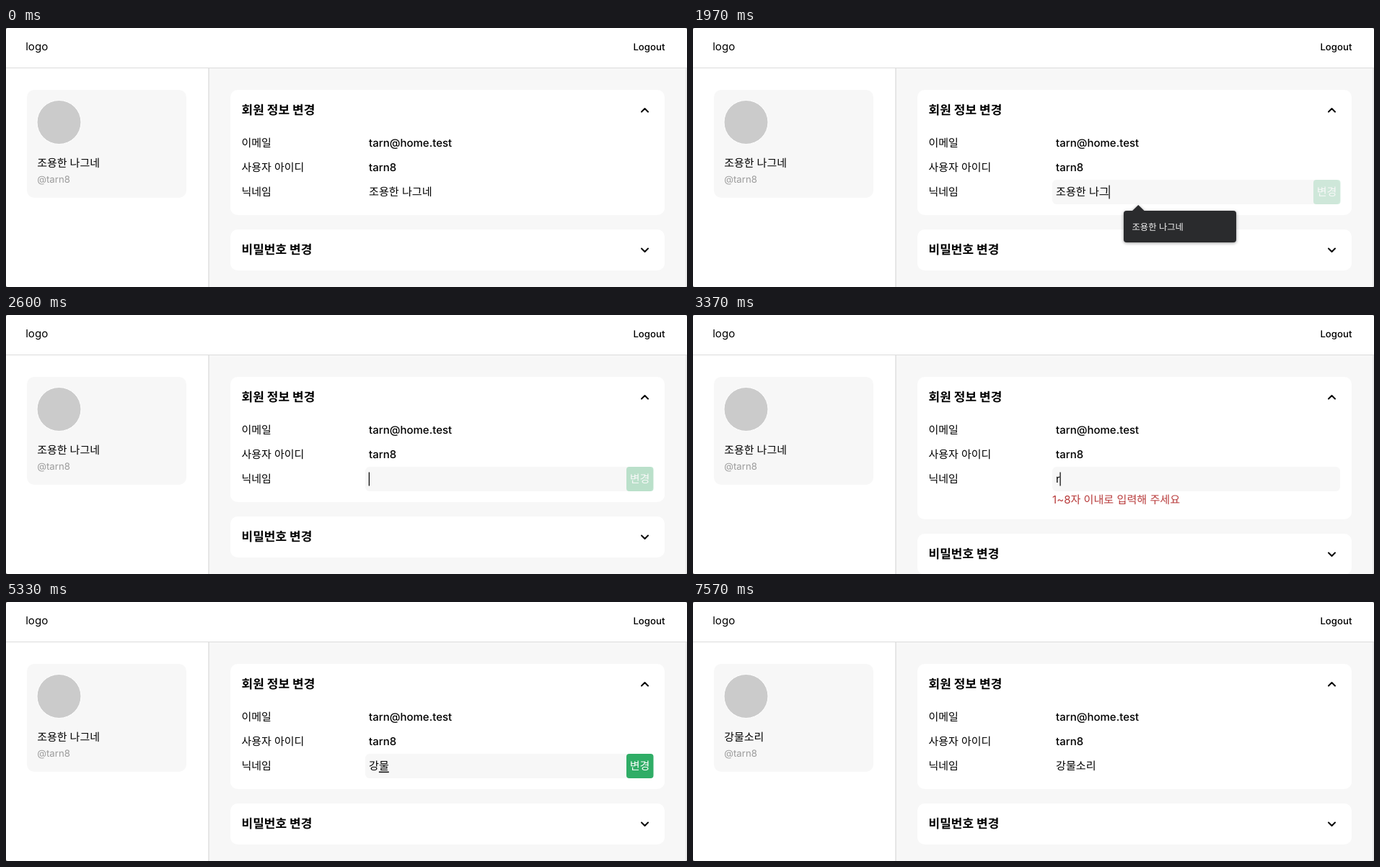
Write an HTML page that moves like this. It is 944 px wide and 360 px high and loops after 8 s.

```html
<!DOCTYPE html>
<html lang="ko">
<head>
<meta charset="utf-8">
<title>회원 정보 변경</title>
<style>
  html, body { margin: 0; width: 100%; height: 100%; overflow: hidden; background: #777; }
  svg { display: block; width: 100vw; height: 100vh; border-radius: 2.5px; background: #fff; }
  text {
    font: 15.1px Inter, "Noto Sans CJK KR", "Noto Sans CJK", "Noto Sans", sans-serif;
    white-space: pre;
    text-rendering: geometricPrecision;
  }
  .title { font-size: 17px; font-weight: 700; }
  .label { font-size: 15px; font-weight: 500; }
  .small { font-size: 13.2px; }
  .hint { font-size: 12.3px; }
  .chevron { fill: none; stroke: #000; stroke-width: 2; stroke-linecap: round; stroke-linejoin: round; }
  #popup { filter: drop-shadow(0 1px 2px rgba(0, 0, 0, .4)); }
</style>
</head>
<body>
<svg viewBox="0 0 944 360" preserveAspectRatio="none">
  <!-- page frame -->
  <rect x="281" y="55" width="663" height="305" fill="#f7f7f7"/>
  <rect y="55" width="944" height="1" fill="#dcdcdc"/>
  <rect x="280.5" y="56" width="1" height="304" fill="#d2d2d2"/>
  <rect x="942.5" y="56" width="1" height="304" fill="#dedede"/>
  <text x="27.2" y="30.5">logo</text>
  <text x="913.4" y="31" class="small" font-weight="500" text-anchor="end" style="font-weight:500">Logout</text>

  <!-- profile card -->
  <rect x="29" y="86" width="221" height="150" rx="10" fill="#f7f7f7"/>
  <circle cx="73.5" cy="131" r="30.5" fill="#cbcbcb" stroke="#fff"/>
  <text id="profile" class="label" x="43.2" y="193"></text>
  <text x="43.2" y="215" class="small" fill="#9c9c9c">@tarn8</text>

  <!-- account panel -->
  <rect id="panel" x="311" y="86" width="602" height="174" rx="10" fill="#fff"/>
  <text x="326.5" y="120" class="title">회원 정보 변경</text>
  <path class="chevron" d="M881 116.5l4.5-4.5 4.5 4.5"/>
  <text x="326.5" y="165" class="label">이메일</text>
  <text x="503" y="165" class="label">tarn@home.test</text>
  <text x="326.5" y="199" class="label">사용자 아이디</text>
  <text x="503" y="199" class="label">tarn8</text>
  <text x="326.5" y="233" class="label">닉네임</text>

  <!-- nickname field -->
  <rect id="field" x="498" y="211" width="399" height="34" rx="6" fill="#f7f7f7"/>
  <text id="value" x="503" y="233"></text>
  <rect id="underline" y="235.6" height="1.5"/>
  <rect id="caret" y="218.5" width="1.2" height="19"/>
  <g id="button">
    <rect x="860" y="211" width="37.5" height="34" rx="4" fill="#2fad66"/>
    <text x="878.6" y="233" text-anchor="middle" fill="#fff">변경</text>
  </g>
  <text id="error" x="498" y="262" fill="#b83a3a">1~8자 이내로 입력해 주세요</text>

  <!-- password panel -->
  <g id="password">
    <rect x="311" y="280" width="602" height="57" rx="10" fill="#fff"/>
    <text x="326.5" y="314" class="title">비밀번호 변경</text>
    <path class="chevron" d="M881 306.5l4.5 4.5 4.5-4.5"/>
  </g>

  <!-- autofill popup -->
  <g id="popup">
    <path d="M608 255l9.3-9 9.3 9z" fill="#2a2b2d"/>
    <rect x="597" y="254" width="156" height="44" rx="4" fill="#2a2b2d"/>
    <text x="608.5" y="280.5" class="hint" fill="#f4f4f4">조용한 나그네</text>
  </g>
</svg>
<script>
const LOOP = 8000;
const TICK = 70;
const OLD_NAME = '조용한 나그네';
const NEW_NAME = '강물소리';
const SUBMIT = 7360;
const OFF = -1;

// [time, field text, caret index, is composing]
const STEPS = [
  [0, OLD_NAME, OFF],
  [500, OLD_NAME, 6],
  [1060, OLD_NAME, OFF],
  [1270, OLD_NAME, 7],
  [1760, OLD_NAME, OFF],
  [1970, '조용한 나그', 6],
  [2180, '조용한 나', 5],
  [2250, '조용한 ', 4],
  [2320, '조용한', 3],
  [2390, '조용', 2],
  [2460, '조', 1],
  [2530, '', 0],
  [2810, '', OFF],
  [3370, 'r', 1],
  [3860, 'r', OFF],
  [3930, '', 0],
  [4350, 'ㄱ', 1, true],
  [4490, '가', 1, true],
  [4560, '강', 1, true],
  [4700, '강ㅁ', 2, true],
  [4770, '강무', 2, true],
  [4840, '강물', 2, true],
  [5330, '강물', OFF, true],
  [5540, '강물ㅅ', 3, true],
  [5610, '강물소', 3, true],
  [5680, '강물솔', 3, true],
  [5750, NEW_NAME, 4, true],
  [6310, NEW_NAME, OFF, true],
  [6800, NEW_NAME, 4, true],
  [7290, NEW_NAME, OFF, true],
  [SUBMIT, NEW_NAME, OFF]
];

// Button opacity, one level per tick
const FADE_IN = [.2, .55, .82, .95, 1];
const FADE_OUT = [.93, .6, .3, 0];
const FADES = [[0, [0]], [1970, FADE_IN], [2460, FADE_OUT], [4700, FADE_IN], [SUBMIT, FADE_OUT]];

const el = id => document.getElementById(id);
const [profile, panel, field, value, underline, caret, button, error, password, popup] =
  ['profile', 'panel', 'field', 'value', 'underline', 'caret', 'button', 'error', 'password', 'popup'].map(el);

const latest = (table, time) => table.findLast(row => row[0] <= time);
const show = (node, visible) => node.setAttribute('visibility', visible ? 'visible' : 'hidden');
const textX = count => 503 + (count > 0 ? value.getSubStringLength(0, count) : 0);

function buttonOpacity(time) {
  const [start, levels] = latest(FADES, time);
  return levels[Math.min(levels.length - 1, Math.floor((time - start) / TICK))];
}

function render(time) {
  const [, text, index, composing] = latest(STEPS, time);
  const saved = time < SUBMIT ? OLD_NAME : NEW_NAME;
  const invalid = text.length === 1;
  const shift = invalid ? 24 : 0;

  profile.textContent = saved;
  value.textContent = text;
  show(field, text !== saved);
  show(error, invalid);
  show(popup, time >= 1970 && time < 2530);
  panel.setAttribute('height', 174 + shift);
  password.setAttribute('transform', `translate(0 ${shift})`);
  button.setAttribute('opacity', buttonOpacity(time));

  show(caret, index !== OFF);
  if (index !== OFF) caret.setAttribute('x', textX(index) - .2);

  show(underline, composing);
  if (composing) {
    const left = textX(text.length - 1);
    underline.setAttribute('x', left);
    underline.setAttribute('width', textX(text.length) - left);
  }
}

const start = performance.now();
function frame() {
  render((performance.now() - start) % LOOP);
  requestAnimationFrame(frame);
}
frame();
</script>
</body>
</html>
```
